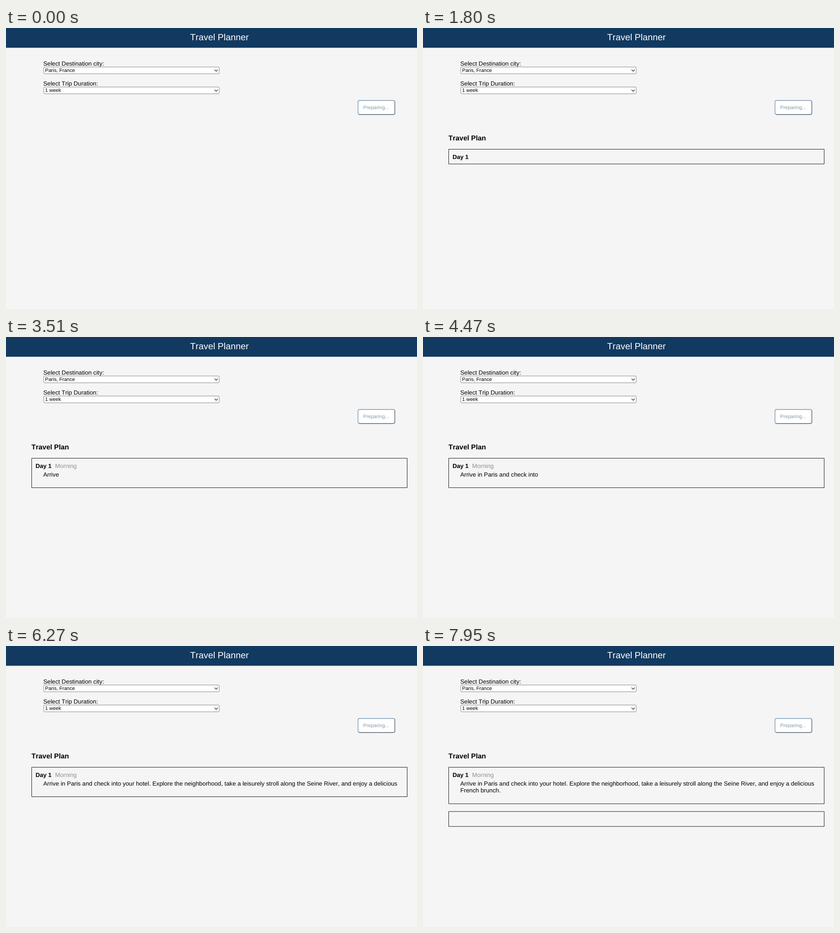
An HTML page for the animation above (8000 ms loop, 904 by 620 pixels).

```html
<!DOCTYPE html>
<html lang="en">
<head>
<meta charset="utf-8">
<title>Travel Planner</title>
<style>
  html, body { margin: 0; width: 100%; height: 100%; overflow: hidden; background: #f5f5f5; }
  svg { display: block; width: 904px; height: 620px; }
  text {
    font: 13.21px "Liberation Sans", sans-serif;
    font-kerning: none;
    text-rendering: geometricPrecision;
    white-space: pre;
  }
  .title { font-size: 19.82px; fill: #fff; }
  .field { font-size: 11.01px; }
  .heading { font-size: 15.46px; font-weight: bold; }
  .day { font-weight: bold; }
  .time { fill: #919191; }
  .select { fill: #fff; stroke: #767676; stroke-width: .9; }
  .chevron { fill: none; stroke: #111; stroke-width: 1.2; }
  .edge { fill: none; stroke-width: 1.65; }
  .card { fill: none; stroke: #000; stroke-width: .9; }
</style>
</head>
<body>
<svg viewBox="0 0 904 620">
  <rect width="904" height="43.6" fill="#12395f"/>
  <text class="title" x="405" y="27">Travel Planner</text>

  <text x="82" y="82.7">Select Destination city:</text>
  <rect class="select" x="83" y="86" width="386" height="15" rx="2"/>
  <text class="field" x="86.1" y="97.3">Paris, France</text>
  <path class="chevron" d="M458.8 91.9l3.5 3.5 3.5-3.5"/>

  <text x="82" y="126.8">Select Trip Duration:</text>
  <rect class="select" x="83" y="130.2" width="386" height="15" rx="2"/>
  <text class="field" x="86.1" y="141.4">1 week</text>
  <path class="chevron" d="M458.8 136.1l3.5 3.5 3.5-3.5"/>

  <rect x="774.3" y="159.8" width="81" height="31" rx="3.5" fill="#fff"/>
  <path class="edge" stroke="#8ba5be" d="M775.3 189.8Q774.3 188.8 774.3 187.3V163.3Q774.3 159.8 777.8 159.8H851.8Q853.5 159.8 854.3 160.8"/>
  <path class="edge" stroke="#687784" d="M854.3 160.8Q855.3 161.8 855.3 163.3V187.3Q855.3 190.8 851.8 190.8H777.8Q776.2 190.8 775.3 189.8"/>
  <text class="field" x="785.6" y="178.8" fill="#8798a7">Preparing...</text>

  <text id="heading" class="heading" x="56" y="248.3"></text>
  <path id="card1" class="card"/>
  <text id="day" class="day" x="64.9" y="288.6"></text>
  <text id="time" class="time" x="108" y="288.6"></text>
  <text id="line1" x="82" y="307.9"></text>
  <text id="line2" x="82" y="323.2"></text>
  <text id="tail" x="64.9" y="352.4"></text>
  <path id="card2" class="card"/>
</svg>
<script>
const LOOP = 8000;
const el = id => document.getElementById(id);

// Each track lists [start time, value]; the value holds until the next start.
const labels = {
  heading: [[360, 'Travel Plan']],
  day: [[1410, 'Day'], [1650, 'Day 1</'], [1800, 'Day 1']],
  time: [[2640, 'Morning</'], [2820, 'Morning']],
  tail: [[6810, '</'], [6870, '']],
};

// Streamed text: each piece is appended at its time.
const streams = {
  line1: [
    [3510, 'Arrive'], [3540, ' in'], [3630, ' Paris'], [3720, ' and'],
    [4440, ' check'], [4470, ' into'], [4620, ' your'], [4740, ' hotel'],
    [4890, '.'], [4980, ' Explore'], [5070, ' the neighborhood'], [5160, ', take'],
    [5280, ' a leisure'], [5370, 'ly'], [5430, ' stroll'], [5520, ' along'],
    [5610, ' the'], [5670, ' Se'], [5790, 'ine'], [5970, ' River,'],
    [6180, ' and enjoy a'], [6270, ' delicious'],
  ],
  line2: [[6390, 'French'], [6450, ' brunch'], [6600, '.']],
};

const cards = {
  card1: { top: 267.5, bottoms: [[750, 284.4], [1320, 300], [3510, 332.5], [6390, 348.1], [6810, 363.4], [6870, 348.1]] },
  card2: { top: 365.2, bottoms: [[7440, 382.4], [7950, 398.1]] },
};

const reached = (steps, t) => steps.filter(([start]) => start <= t).map(([, value]) => value);
const latest = (steps, t) => reached(steps, t).pop() ?? '';

function setText(id, value) {
  const node = el(id);
  if (node.textContent !== value) node.textContent = value;
}

function draw(t) {
  for (const id in labels) setText(id, latest(labels[id], t));
  for (const id in streams) setText(id, reached(streams[id], t).join(''));
  for (const id in cards) {
    const { top, bottoms } = cards[id];
    const bottom = latest(bottoms, t);
    el(id).setAttribute('d', bottom ? `M56.5 ${top}H882.4V${bottom}H56.5Z` : '');
  }
}

const origin = performance.now();
function tick() {
  draw((performance.now() - origin) % LOOP);
  requestAnimationFrame(tick);
}
tick();
</script>
</body>
</html>
```
